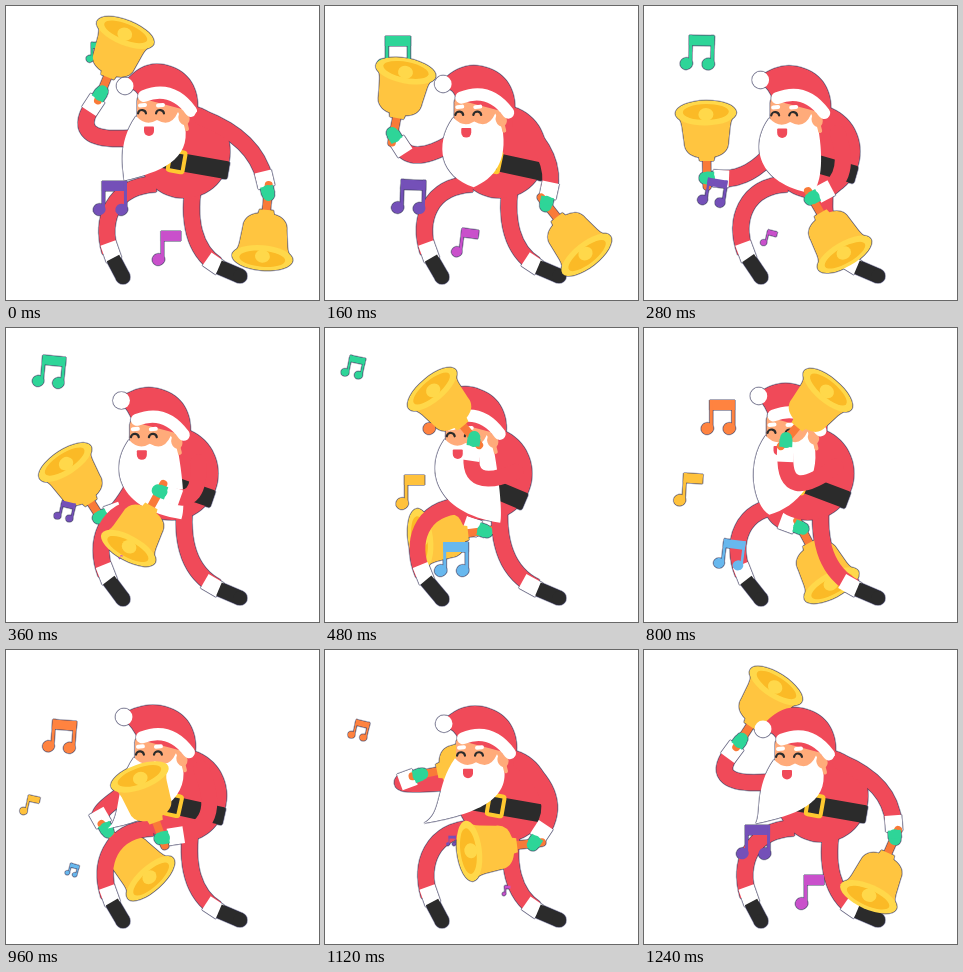
Write an HTML page with a canvas that moves like this. It is 313x294 px and loops after 1.28 s.

```html
<!DOCTYPE html>
<html lang="en">
<head>
<meta charset="utf-8">
<title>Dancing Santa with bells</title>
<style>
  html, body { margin: 0; width: 100%; height: 100%; overflow: hidden; background: #fff; }
  canvas { display: block; }
</style>
</head>
<body>
<canvas id="stage" width="313" height="294"></canvas>
<script>
const W = 313, H = 294, LOOP = 1280, STEP = 40;
const RED = '#f04a59', WHITE = '#fff', BLACK = '#2b2b2b', SKIN = '#ffab7a',
      GREEN = '#2ed598', GOLD = '#ffc540', RIM = '#ffd84a', INNER = '#fbba26', ORANGE = '#f97a38';

const screen = document.getElementById('stage').getContext('2d');
const layer = () => Object.assign(document.createElement('canvas'), { width: W, height: H }).getContext('2d');
const c = layer(), shade = layer();

const rad = deg => deg * Math.PI / 180;
const clamp = v => Math.min(1, Math.max(0, v));
const ease = u => (1 - Math.cos(Math.PI * clamp(u))) / 2;
const mix = (p, q, k) => p.map((v, i) => v + (q[i] - v) * k);
// Cosine of the loop phase, delayed by some degrees.
const wave = (t, lag = 0) => Math.cos(t / LOOP * 2 * Math.PI - rad(lag));
// Lean: 0 upright, 1 bent over; the way back is quicker and then rests.
const leanAt = t => t < 640 ? ease(t / 640) : 1 - ease((t - 640) / 440);

// Cyclic smooth path through a few key points; the last value gains `turn` per loop.
function path(keys, turn = 0) {
  const n = keys.length;
  const key = i => {
    const lap = Math.floor(i / n), k = keys[i - lap * n].slice();
    k[0] += lap * LOOP;
    k[k.length - 1] += lap * turn;
    return k;
  };
  return t => {
    let i = n - 1;
    while (keys[i][0] > t) i--;
    const [a, p, q, b] = [i - 1, i, i + 1, i + 2].map(key);
    const d = q[0] - p[0], u = (t - p[0]) / d;
    return p.map((v, j) => {
      const m0 = (q[j] - a[j]) / (q[0] - a[0]) * d, m1 = (b[j] - v) / (b[0] - p[0]) * d;
      const e = q[j] - v;
      return v + u * (m0 + u * (3 * e - 2 * m0 - m1 + u * (m0 + m1 - 2 * e)));
    }).slice(1);
  };
}

// Time, hand x and y, bell direction
const frontHand = path([
  [0, 262, 187, 95], [80, 257, 194, 65], [280, 168, 192, 60], [480, 149, 111, 230],
  [640, 168, 88, 305], [800, 142, 112, 310], [960, 156, 188, 250]
]);
const backHand = path([
  [0, 95, 87, -68], [280, 63, 172, -91], [480, 160, 203, -187],
  [640, 189, 187, -264], [800, 157, 200, -298], [960, 101, 180, -312]
], -360);

const notes = [
  { color: GREEN, pair: true, behind: true, born: 1240, end: 1900, x: 96, y: 45 },
  { color: '#ff8340', pair: true, behind: true, born: 400, end: 1240, x: 127, y: 87 },
  { color: '#7450b8', pair: true, born: 1100, end: 1760, x: 129, y: 190 },
  { color: '#c950cb', born: 1100, end: 1660, x: 184, y: 240 },
  { color: '#ffc23c', born: 360, end: 1090, x: 101, y: 162 },
  { color: '#68b8ee', pair: true, born: 380, end: 1030, x: 141, y: 229 }
];

function fill(color, build) {
  c.beginPath();
  build();
  c.fillStyle = color;
  c.fill();
}
function stroke(color, width, cap, build) {
  c.beginPath();
  build();
  Object.assign(c, { strokeStyle: color, lineWidth: width, lineCap: cap });
  c.stroke();
}
const oval = (color, x, y, rx, ry = rx, tilt = 0) => fill(color, () => c.ellipse(x, y, rx, ry, tilt, 0, 7));
const line = (color, width, cap, x1, y1, x2, y2) =>
  stroke(color, width, cap, () => { c.moveTo(x1, y1); c.lineTo(x2, y2); });
function placed(x, y, deg, draw, scale = 1) {
  c.save();
  c.translate(x, y);
  c.rotate(rad(deg));
  c.scale(scale, scale);
  draw();
  c.restore();
}

// Notes drift left at one speed, then rise, turn and shrink away.
function drawNote({ color, pair, born, end, x, y }, t) {
  if (t < born) t += LOOP;
  if (t < born || t >= end) return;
  const age = t - born, fade = clamp(1 - (end - t) / 360);
  const scale = clamp(age / 70) * (1 - fade * fade);
  placed(x - age * .128, y - 12 * fade, 20 * fade, () => {
    const left = pair ? -10 : -6, width = pair ? 25 : 20;
    fill(color, () => c.rect(left, -15, width, 10));
    for (const stem of pair ? [left, left + width - 3] : [left]) {
      fill(color, () => c.rect(stem, -15, 3, 28));
      oval(color, stem - 2.5, 13.5, 6.2, 5.8, -.3);
    }
  }, scale);
}

function drawBell(x, y, dir) {
  placed(x, y, dir + 90, () => {
    line(ORANGE, 8, 'round', 0, 8, 0, -20);
    fill(GOLD, () => {
      c.moveTo(-7, -17);
      for (const side of [-1, 1]) {
        const down = side < 0;
        const wall = [[8, -21], [22, -24, 22, -36], [24, -52], [25, -59, 30, -65]];
        if (down) {
          c.lineTo(-8, -21);
          c.quadraticCurveTo(-22, -24, -22, -36);
          c.lineTo(-24, -52);
          c.quadraticCurveTo(-25, -59, -30, -65);
        } else {
          c.lineTo(30, -65);
          c.quadraticCurveTo(25, -59, 24, -52);
          c.lineTo(22, -36);
          c.quadraticCurveTo(22, -24, 8, -21);
        }
      }
      c.lineTo(7, -17);
    });
    oval(RIM, 0, -65, 30.5, 12.5);
    oval(INNER, 0, -66, 23, 8);
    oval(RIM, 0, -63.5, 7.5, 6.5);
  });
}

function drawArm([sx, sy], [ex, ey], [hx, hy, dir]) {
  const len = Math.hypot(hx - ex, hy - ey) || 1, ux = (hx - ex) / len, uy = (hy - ey) / len;
  const along = d => [hx + ux * d, hy + uy * d];
  stroke(RED, 16, 'round', () => {
    c.moveTo(sx, sy);
    c.quadraticCurveTo(ex, ey, ...along(-14));
  });
  line(WHITE, 17, 'butt', ...along(-22), ...along(-6));
  drawBell(hx, hy, dir);
  line(GREEN, 12, 'round', ...along(-2), ...along(2));
  line(GREEN, 13, 'butt', ...along(-7), ...along(1));
}

function drawBackArm(t, lean) {
  drawArm(mix([125, 132], [135, 165], lean), mix([62, 137], [130, 195], Math.sqrt(lean)), backHand(t));
}

// The elbow bulges sideways from the line between shoulder and hand.
function drawFrontArm(t, lean, torsoX) {
  const hand = frontHand(t), shoulder = mix([torsoX + 18, 112], [torsoX + 32, 149], lean);
  const [dx, dy] = [hand[0] - shoulder[0], hand[1] - shoulder[1]];
  const bulge = (42 - 18 * wave(t, 30)) / Math.hypot(dx, dy);
  const elbow = [shoulder[0] + dx / 2 + dy * bulge, shoulder[1] + dy / 2 - dx * bulge];
  drawArm(shoulder, elbow, hand);
}

function drawShoe(x, y, toeX, toeY) {
  line(BLACK, 14, 'butt', x, y, toeX, toeY);
  oval(BLACK, toeX, toeY, 7);
}

function drawLegs(d) {
  stroke(RED, 16, 'butt', () => {
    c.moveTo(150 + d * .8, 178);
    c.bezierCurveTo(105 + d * .6, 180, 95 + d * .6, 215, 104 + d * .35, 246);
  });
  line(WHITE, 16, 'butt', 102 + d * .4, 237, 108 + d * .35, 254);
  drawShoe(107 + d * .35, 252, 117, 271);
  stroke(RED, 16, 'butt', () => {
    c.moveTo(189 + d * .8, 172);
    c.bezierCurveTo(180 + d * .5, 215, 189 + d * .4, 245, 211, 259);
  });
  line(WHITE, 16, 'butt', 201 + d * .2, 253, 214, 262);
  drawShoe(213, 261, 234, 270);
}

function drawTorso(x, tilt) {
  oval(RED, x, 145.5, 46, 46.5);
  placed(x, 145.5, tilt, () => {
    fill(BLACK, () => c.roundRect(-47, 2, 94, 18, 2));
    stroke('#ffc930', 4, 'butt', () => c.roundRect(-13, 1, 15, 20, 2));
  });
}

// Everything in head space; tip is the beard's end, pom the hat's ball.
function drawHead(tx, ty, px, py) {
  fill(SKIN, () => c.roundRect(131, 88, 46, 36, 7));
  fill(WHITE, () => {
    c.moveTo(130, 110);
    c.quadraticCurveTo(140, 121, 151, 114);
    c.quadraticCurveTo(165, 122, 172, 106);
    c.lineTo(179, 120);
    c.bezierCurveTo(185, 154, (tx + 190) / 2, ty - 8, tx, ty);
    c.bezierCurveTo(118, ty - 10, 110, 138, 130, 110);
  });
  oval(SKIN, 178, 112, 5.5, 7, -.3);
  line(SKIN, 4, 'round', 179, 115, 181, 123);
  fill(RED, () => {
    c.moveTo(px, py - 4);
    c.bezierCurveTo(px + 14, 59, 148, 54, 166, 61);
    c.bezierCurveTo(186, 68, 194, 88, 191, 107);
    c.lineTo(134, 92);
    c.quadraticCurveTo(130, 80, px, py + 3);
  });
  stroke(WHITE, 12, 'round', () => {
    c.moveTo(138, 90);
    c.quadraticCurveTo(166, 79, 185, 105);
  });
  oval(WHITE, px, py, 8.5);
  for (const x of [136, 154]) {
    stroke(BLACK, 2.2, 'round', () => c.arc(x, 108, 4, Math.PI * 1.05, Math.PI * 1.95));
    line(WHITE, 4, 'round', x - 2, 99.5, x + 3, 99);
  }
  fill(RED, () => c.roundRect(138, 120.5, 10, 9.5, [1, 1, 5, 5]));
}

function drawScene(t) {
  const lean = leanAt(t), torsoX = 178 - 20 * lean;
  const headX = -12 * lean, headY = 2.5 * wave(t, 90) - lean;
  const tip = [137 + 40 * wave(t, 118), 184 + 11 * wave(t, 150)];
  const pom = [119 - 6 * lean, 73 + 4 * wave(t) + 3 * wave(t, 90) + 3 * wave(2 * t)];

  c.clearRect(0, 0, W, H);
  notes.filter(n => n.behind).forEach(n => drawNote(n, t));
  drawBackArm(t, lean);
  drawLegs(torsoX - 178);
  drawTorso(torsoX, 10 + 15 * lean);
  placed(headX, headY, 0, () =>
    drawHead(tip[0] - headX, tip[1] - headY, pom[0] - headX, pom[1] - headY));
  drawFrontArm(t, lean, torsoX);
  notes.filter(n => !n.behind).forEach(n => drawNote(n, t));
}

// Thin dark contour around the whole silhouette.
function present() {
  shade.globalCompositeOperation = 'copy';
  shade.drawImage(c.canvas, 0, 0);
  shade.globalCompositeOperation = 'source-in';
  shade.fillStyle = '#26264e';
  shade.fillRect(0, 0, W, H);
  screen.fillStyle = WHITE;
  screen.fillRect(0, 0, W, H);
  screen.globalAlpha = .7;
  for (const [x, y] of [[.6, 0], [-.6, 0], [0, .6], [0, -.6]]) screen.drawImage(shade.canvas, x, y);
  screen.globalAlpha = 1;
  screen.drawImage(c.canvas, 0, 0);
}

const start = performance.now();
function tick() {
  const t = (performance.now() - start) % LOOP;
  drawScene(Math.floor(t / STEP) * STEP);
  present();
  requestAnimationFrame(tick);
}
tick();
</script>
</body>
</html>
```
